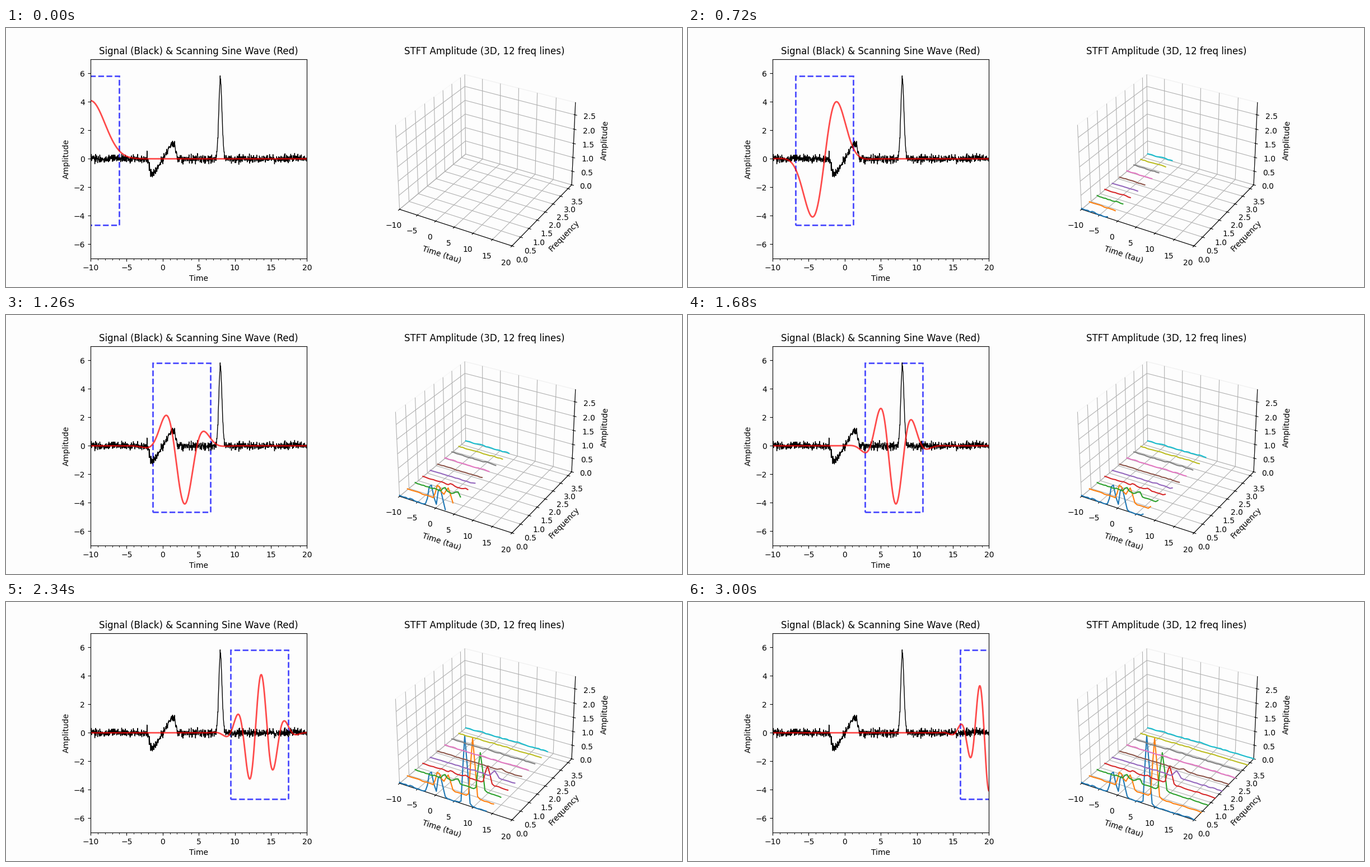
Animation of 1207 by 464 pixels, one loop 3060 ms. Source, as a matplotlib script:

```python
import numpy as np
import matplotlib.pyplot as plt
from matplotlib.animation import FuncAnimation
from matplotlib.patches import Rectangle
from matplotlib.ticker import AutoMinorLocator

WIDTH, HEIGHT, DPI = 1207, 464, 100
FRAMES, INTERVAL = 51, 60
T0, T1 = -10, 20
HOP, WINDOW, LINES = 20, 80, 10
SIGMA, HALF_BOX = 2.0, 4.0
PEAK = 5.83
MAX_SCAN_FREQ = 0.375
PAPER = "#fdfdfd"

t = np.linspace(T0, T1, (FRAMES - 1) * HOP + 1)
dt = t[1] - t[0]
taus = t[::HOP]


def make_signal():
    rng = np.random.RandomState(0)
    ramp = 0.87 * t * np.exp(-(t / 1.82) ** 10)
    spike = 5.6 * np.exp(-10 * (t - 8) ** 2)
    y = ramp + spike + 0.14 * rng.randn(t.size)
    y[np.argmin(abs(t + 2.16))] = 0.55
    y = np.minimum(y, PEAK - 0.15)
    y[np.argmin(abs(t - 7.97))] = PEAK
    return y


def stft_amplitude(y):
    """Hann-windowed spectrum magnitude, one row per frequency."""
    n = np.arange(WINDOW)
    hann = 0.5 - 0.5 * np.cos(2 * np.pi * n / WINDOW)
    padded = np.pad(y, WINDOW // 2)
    starts = HOP * np.arange(FRAMES)
    chunks = padded[starts[:, None] + n] * hann
    return abs(np.fft.rfft(chunks, axis=1)).T[:LINES] / hann.sum()


def scan_wave(i):
    """Gaussian-windowed cosine, scaled to a constant height."""
    freq = MAX_SCAN_FREQ * i / (FRAMES - 1)
    wave = np.cos(2 * np.pi * freq * t)
    wave = wave * np.exp(-(t - taus[i]) ** 2 / (2 * SIGMA ** 2))
    return 0.7 * PEAK * wave / abs(wave).max()


signal = make_signal()
amps = stft_amplitude(signal)
freqs = np.arange(LINES) / (WINDOW * dt)

# The tiny offset keeps the pixel size from rounding down.
fig = plt.figure(figsize=(WIDTH / DPI + 1e-6, HEIGHT / DPI + 1e-6), dpi=DPI,
                 facecolor=PAPER)
grid = fig.add_gridspec(1, 2, width_ratios=[1, 1.2], left=0.125, right=0.9,
                        bottom=0.11, top=0.88, wspace=0.2)

ax = fig.add_subplot(grid[0], facecolor=PAPER)
ax.plot(t, signal, color="black", lw=1)
wave_line, = ax.plot(t, scan_wave(0), color="red", lw=2, alpha=0.7)
box = Rectangle((T0 - HALF_BOX, -0.8 * PEAK), 2 * HALF_BOX, 1.8 * PEAK,
                fill=False, edgecolor="blue", lw=2, ls="--", alpha=0.7)
ax.add_patch(box)
ax.set(xlim=(T0, T1), ylim=(-7, 7), xlabel="Time", ylabel="Amplitude",
       title="Signal (Black) & Scanning Sine Wave (Red)")
ax.xaxis.set_minor_locator(AutoMinorLocator(5))

ax3 = fig.add_subplot(grid[1], projection="3d", facecolor=PAPER)
ax3.view_init(elev=30, azim=-60)
spectra = [ax3.plot([], [], [], color=f"C{k}")[0] for k in range(LINES)]
ax3.set(xlim=(T0, T1), ylim=(0, freqs[-1]), zlim=(0, 2.92),
        xlabel="Time (tau)", ylabel="Frequency", zlabel="Amplitude",
        title="STFT Amplitude (3D, 12 freq lines)")
for axis in (ax3.xaxis, ax3.yaxis, ax3.zaxis):
    axis.pane.fill = False


def update(i):
    wave_line.set_ydata(scan_wave(i))
    box.set_x(taus[i] - HALF_BOX)
    n = i + 1
    for line, freq, amp in zip(spectra, freqs, amps):
        line.set_data_3d(taus[:n], np.full(n, freq), amp[:n])
    return [wave_line, box, *spectra]


anim = FuncAnimation(fig, update, frames=FRAMES, interval=INTERVAL,
                     init_func=lambda: update(0), repeat=True, blit=False)
plt.show()
```
